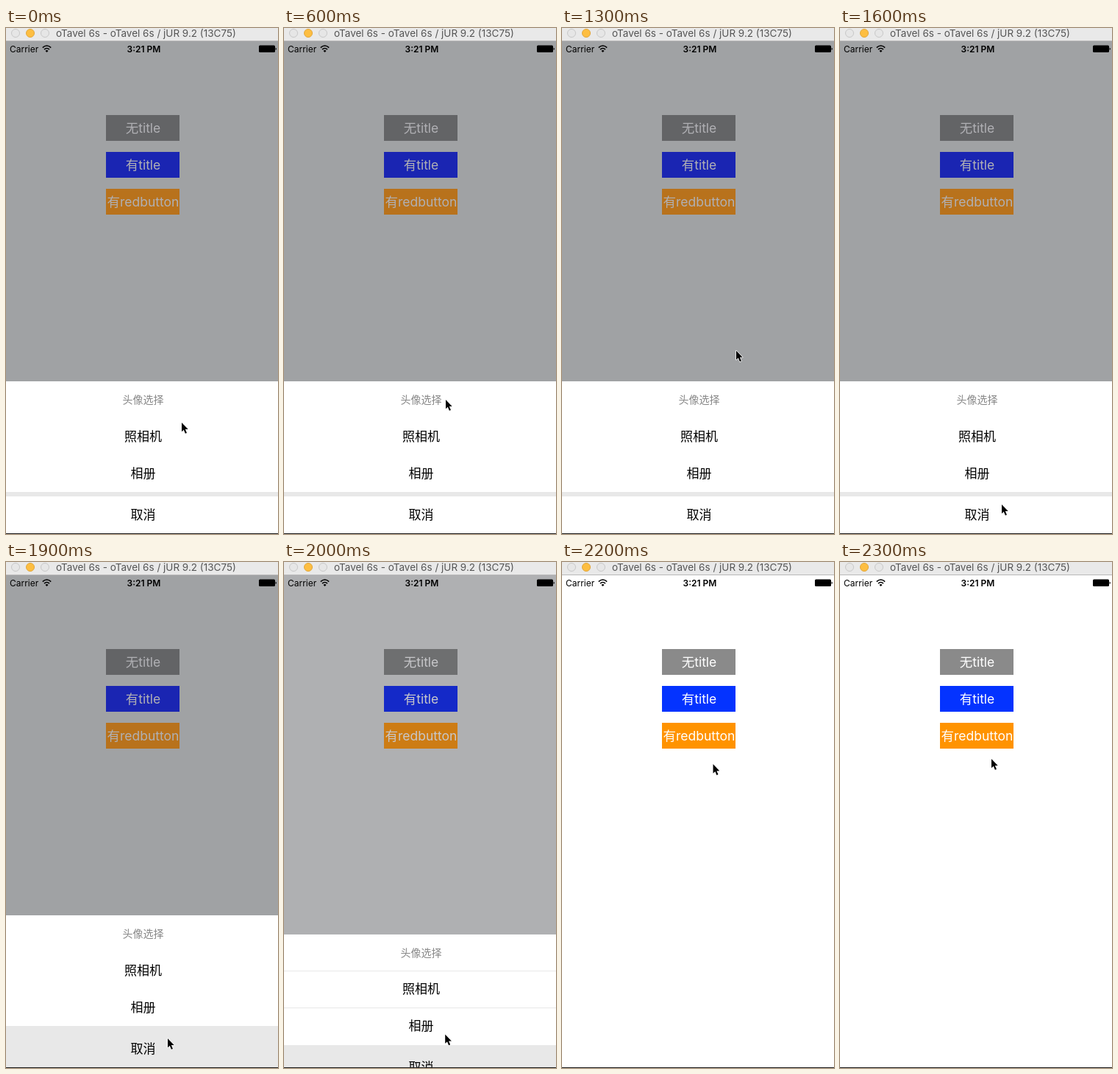
These frames come from a looping animation (370 by 686 pixels, 2400 ms). An HTML page:

```html
<!DOCTYPE html>
<html lang="zh-CN">
<head>
<meta charset="utf-8">
<title>Action sheet</title>
<style>
  html, body { margin: 0; width: 100%; height: 100%; overflow: hidden; background: #fff; }
  svg { display: block; width: 370px; height: 686px; }
  text { font: 17px Inter, "Noto Sans CJK SC", "Noto Sans CJK", sans-serif; }
  .mid { text-anchor: middle; }
  .button { font-size: 17.5px; }
  .bar { font-size: 13.5px; fill: #555; }
  .status { font-size: 12px; }
  .bold { font-weight: 600; }
  .hint { font-size: 14px; fill: #888; }
</style>
</head>
<body>
<svg viewBox="0 0 370 686">
  <rect width="370" height="686" fill="#fff"/>
  <rect id="dim" y="18" width="370" height="668" fill="#2e3135"/>

  <!-- status bar -->
  <text class="status" x="5" y="32.5">Carrier</text>
  <g fill="none" stroke="#000" stroke-width="1.6">
    <path d="M49.8 26.6Q55.5 21.4 61.2 26.6M52 29.1Q55.5 25.9 59 29.1"/>
    <path d="M55.5 33L53.5 30.9Q55.5 29.3 57.5 30.9Z" fill="#000" stroke="none"/>
  </g>
  <text class="status bold mid" x="187.5" y="32.5">3:21 PM</text>
  <rect x="344" y="23.5" width="22" height="9.5" rx="1.5"/>
  <path d="M366.6 26.5Q369.4 28.3 366.6 30Z"/>

  <g id="buttons"></g>

  <g id="sheet">
    <rect y="479" width="370" height="207" fill="#fff"/>
    <path id="lines" d="M0 528.5H370M0 578.5H370" stroke="#e8e8e8"/>
    <rect y="629" width="370" height="6" fill="#e8e8e8"/>
    <rect id="cancel" y="635" width="370" height="51"/>
    <text class="hint mid" x="186.5" y="509">头像选择</text>
    <text class="mid" x="186.5" y="559.5">照相机</text>
    <text class="mid" x="186.5" y="609.5">相册</text>
    <text class="mid" x="186.5" y="665.5">取消</text>
  </g>

  <!-- window frame -->
  <rect width="370" height="17" fill="#e9e9e9"/>
  <rect y="17" width="370" height="1" fill="#b8b8b8"/>
  <g fill="#e6e6e6" stroke="#c8c8c8">
    <circle cx="13" cy="7" r="5.5"/>
    <circle cx="33" cy="7" r="5.5" fill="#fdbe41" stroke="#e2a73c"/>
    <circle cx="53" cy="7" r="5.5"/>
  </g>
  <text class="bar" x="68" y="12">oTavel 6s - oTavel 6s / jUR 9.2 (13C75)</text>
  <rect y="685" width="370" height="1" fill="#1c1c1c"/>

  <path id="cursor" d="M0 0V14.2L3.2 11.3 5.6 17 8 16 5.6 10.4H10Z" stroke="#fff" stroke-width="1.6" paint-order="stroke" stroke-linejoin="round"/>
</svg>
<script>
const $ = id => document.getElementById(id);
const STEP = 100, STEPS = 24, DISMISS = 19;

// Label, bright colour, dimmed colour
const buttons = [
  ['无title', '#8a8a8a', '#636466'],
  ['有title', '#0433ff', '#1a25b2'],
  ['有redbutton', '#ff9300', '#b8721c']
];
$('buttons').innerHTML = buttons.map(([label], i) =>
  `<rect x="136" y="${118 + 50 * i}" width="100" height="35"/>
   <text class="button mid" x="186.5" y="${142 + 50 * i}">${label}</text>`).join('');
const boxes = document.querySelectorAll('#buttons rect');

// Cursor strokes: each runs in an arc from the previous end point
const strokes = [
  { from: 0, to: 6, x: 220, y: 504, bow: 0 },
  { from: 7, to: 10, x: 199, y: 237, bow: 0 },
  { from: 10, to: 12, x: 222, y: 633, bow: -24 },
  { from: 12, to: 14, x: 196, y: 242, bow: 28 },
  { from: 14, to: 16, x: 220, y: 646, bow: 0 },
  { from: DISMISS, to: 23.05, x: 206, y: 267, bow: -10 }
];

function easeInOut(p, power) {
  p = Math.min(1, Math.max(0, p));
  return p < .5 ? (2 * p) ** power / 2 : 1 - (2 - 2 * p) ** power / 2;
}

function cursorAt(step) {
  let x = 239, y = 535;
  for (const s of strokes) {
    const e = easeInOut((step - s.from) / (s.to - s.from), 5);
    x += (s.x - x) * e + s.bow * 4 * e * (1 - e);
    y += (s.y - y) * e;
  }
  return [x, y];
}

function draw(now) {
  const step = Math.floor(now / STEP) % STEPS;
  const slide = (step - DISMISS) / 3.17;
  const dim = 1 - easeInOut(slide, 2.5);
  const mix = (bright, dark) => `color-mix(in srgb, ${dark} ${100 * dim * dim}%, ${bright})`;

  $('cursor').setAttribute('transform', `translate(${cursorAt(step)}) scale(.87)`);
  $('sheet').setAttribute('transform', `translate(0 ${207 * easeInOut(slide, 3)})`);
  $('dim').setAttribute('opacity', .45 * dim);
  $('lines').setAttribute('opacity', step > DISMISS ? 1 : 0);
  $('cancel').setAttribute('fill', step >= DISMISS ? '#e8e8e8' : '#fff');
  buttons.forEach(([, bright, dark], i) => boxes[i].style.fill = mix(bright, dark));
  $('buttons').style.fill = mix('#fff', '#b0b0b4');
}

const start = performance.now();
function tick() {
  draw(performance.now() - start);
  requestAnimationFrame(tick);
}
tick();
</script>
</body>
</html>
```
